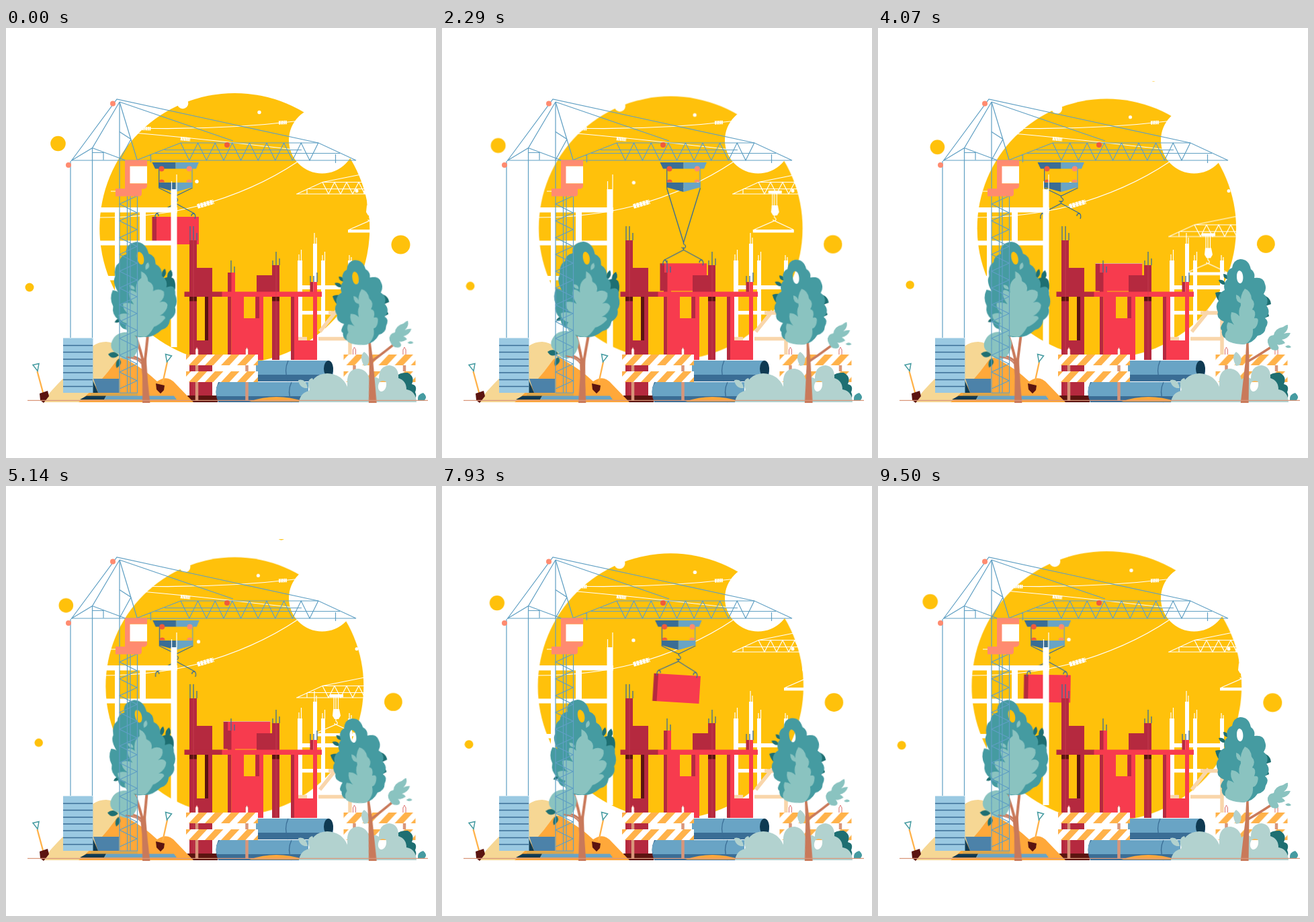
Recreate the animation shown at these times as an HTML page. Size 640 by 640 pixels, loop 9570 ms.

```html
<!DOCTYPE html>
<html lang="en">
<head>
<meta charset="utf-8">
<title>Construction site</title>
<style>
html, body { margin: 0; width: 100%; height: 100%; overflow: hidden; background: #fff; }
svg { display: block; width: 100%; height: 100%; }
.sun, .trolley, .ropes, .hoist, .tilt, .carried, .placed, .jib, .cart, .load, .tree1, .tree2 {
  animation: 9.57s ease-in-out infinite;
}
.sun { animation-name: sun; animation-timing-function: linear; transform-origin: 340.3px 298px; }
.trolley { animation-name: trolley; }
.ropes { animation-name: ropes; transform-origin: 0 238px; }
.hoist { animation-name: hoist; }
.tilt { animation-name: tilt; transform-origin: 359.5px 255px; }
.carried { animation-name: carried; animation-timing-function: step-end; }
.placed { animation-name: placed; animation-timing-function: step-end; }
.jib { animation-name: jib; }
.cart { animation-name: cart; }
.load { animation-name: load; transform-origin: 491px 284px; }
.tree1 { animation-name: tree1; transform-origin: 208px 557px; }
.tree2 { animation-name: tree2; transform-origin: 545px 557px; }

@keyframes sun { 50% { transform: scale(.9515); } }
@keyframes trolley {
  0%, 47%, 53%, 100% { transform: translateX(-107px); }
  14.6%, 32.1%, 65.3%, 79% { transform: none; }
}
@keyframes ropes {
  0%, 15.7%, 31.5%, 65.3%, 79.3%, 100% { transform: scaleY(1); }
  23%, 24.5%, 72%, 73.5% { transform: scaleY(6.77); }
}
@keyframes hoist {
  0%, 15.7%, 31.5%, 65.3%, 79.3%, 100% { transform: translateY(0); }
  23%, 24.5%, 72%, 73.5% { transform: translateY(69.3px); }
}
@keyframes tilt {
  0%, 20%, 79%, 100% { transform: rotate(0deg); }
  7% { transform: rotate(-3deg); }
  15.7% { transform: rotate(-.8deg); }
  83% { transform: rotate(3.5deg); }
  95% { transform: rotate(2deg); }
  99.3% { transform: rotate(.9deg); }
}
@keyframes carried { 0%, 73% { opacity: 1; } 24% { opacity: 0; } 100% { opacity: 1; } }
@keyframes placed { 0%, 73% { opacity: 0; } 24% { opacity: 1; } 100% { opacity: 0; } }
@keyframes jib {
  0%, 27%, 66%, 100% { transform: translateY(0); }
  46%, 54.3% { transform: translateY(68px); }
}
@keyframes cart {
  0%, 11%, 80%, 100% { transform: translateX(50px); }
  27%, 66.3% { transform: translateX(0); }
}
@keyframes load { 0%, 65%, 80%, 100% { transform: rotate(0deg); } 67.2% { transform: rotate(5.5deg); } }
@keyframes tree1 {
  0% { transform: rotate(-1.6deg); animation-timing-function: cubic-bezier(.55,0,.6,1); }
  32.5% { transform: rotate(3.2deg); }
  50% { transform: rotate(-3deg); }
  67% { transform: rotate(3.2deg); animation-timing-function: cubic-bezier(.4,0,.45,1); }
  100% { transform: rotate(-1.9deg); }
}
@keyframes tree2 {
  0% { transform: rotate(-5.7deg); }
  15.7%, 43%, 72%, 99.3%, 100% { transform: rotate(0deg); }
  29.3%, 84% { transform: rotate(-5.4deg); }
  56% { transform: rotate(-7.3deg); }
}

.line { fill: none; stroke: #5f9fc3; stroke-width: 1.2; }
.wire { fill: none; stroke: #fff; stroke-width: 1.2; }
.beads { fill: none; stroke: #fff; stroke-width: 5.5; stroke-dasharray: 2 .6; }
.steel { fill: none; stroke: #3a6d95; stroke-width: 1.3; }
.white { fill: #fff; }
.sunny { fill: #ffc10b; }
.red { fill: #f73b4e; }
.wine { fill: #b5293f; }
.maroon { fill: #5b1410; }
.blue { fill: #69a4c5; }
.mid { fill: #3a6d95; }
.navy { fill: #0f3a52; }
.coral { fill: #ff8b70; }
.flame { fill: #f05a3c; }
.orange { fill: #ffa83a; }
.sand { fill: #f6d794; }
.teal { fill: #459ba1; }
.mint { fill: #8ac3c0; }
.pine { fill: #1e6f72; }
.pale { fill: #b2d2cf; }
.bark { fill: none; stroke: #c9795a; }
</style>
</head>
<body>
<svg viewBox="0 0 640 640">
<defs>
  <clipPath id="stage"><rect y="79" width="640" height="478.500"/></clipPath>
  <pattern id="stripes" x="287" width="24" height="25" y="486" patternUnits="userSpaceOnUse">
    <path fill="#ffb24a" d="M0 0h12.500l-15 16h-12.500zM24 0h12.500l-15 16h-12.500z"/>
  </pattern>
  <g id="barrier">
    <path d="M284 478v76M358.500 478v76" stroke="#d9967a" stroke-width="4.500"/>
    <path d="M282 486v-7l2-4 2 4v7M356.500 486v-7l2-4 2 4v7" fill="#fff" stroke="#d95a5a" stroke-width=".8"/>
    <path class="white" d="M268 486h107v16h-107zM268 511h107v16h-107z"/>
    <path fill="url(#stripes)" d="M268 486h107v16h-107zM268 511h107v16h-107z"/>
  </g>
  <g id="block">
    <path class="red" d="M330 281h64v41h-64z"/>
    <path class="wine" d="M324.500 281h6.500v41h-6.500z"/>
  </g>
</defs>

<!-- sun -->
<g clip-path="url(#stage)">
  <g class="sun">
    <g class="sunny">
      <circle cx="340.300" cy="298" r="201"/>
      <circle cx="77.500" cy="172" r="11.300"/>
      <circle cx="35" cy="386" r="6.500"/>
      <circle cx="587.500" cy="322.500" r="14"/>
      <circle cx="413" cy="65" r="5.300"/>
    </g>
    <g class="white">
      <circle cx="263" cy="112" r="8.300"/>
      <circle cx="377" cy="125.500" r="2.700"/>
      <circle cx="284" cy="228.500" r="2.700"/>
    </g>
  </g>
</g>
<circle class="white" cx="470.500" cy="167" r="49.500"/>
<circle class="white" cx="522" cy="242.500" r="2.500"/>
<path class="wire" d="M140 282Q220 282 285 265 370 242 434 199M196 149Q320 152 434 138.500M190 156Q270 163 340 171L430 181"/>
<path class="beads" d="M203 149.500l13 .3M406 141l12-.6M260 164.500l14 1.500"/>
<path class="beads" style="stroke-width:7;stroke-dasharray:4 .8" d="M285 265.500l24-7"/>

<!-- far scaffold -->
<path class="white" d="M434 346h7v148h-7zM457 321h6v150h-6zM469 346h6v120h-6zM509 346h6v68h-6zM434 383h81v6h-81zM434 421h50v5.500h-50z"/>
<path class="wire" d="M436 346v-9M439.500 346v-16M459 322v-17M462 322v-10M471 347v-9M474.500 347v-14M511 347v-9M514 347v-6"/>
<path fill="none" stroke="#f9d6ab" stroke-width="5.500" d="M512 412v78M480 424h32M465 462.500h47M434 462.500h14M492 421L467 452"/>

<!-- far crane -->
<g class="jib">
  <path class="wire" d="M432 247h118M433 247l38-17.500h80M471 229.500l60-12 20-4M448 240v7M448 239.500h100M471 229.500l9 17.500 9-17.500 9 17.500 9-17.500 9 17.500 9-17.500 9 17.500 9-17.500"/>
  <g class="cart">
    <path class="white" d="M482 242h20v4.500h-20z"/>
    <path class="wire" d="M488 246v20M491 246v20M494.500 246v20"/>
    <g class="load">
      <path class="white" d="M487 264h9l2 10-3 5h-6l-3-5zM459 300h61v4.500h-61z"/>
      <path class="wire" d="M491 278v4q4 2 1 5-3 1-3-2M461 300l30-13 28 13"/>
    </g>
  </g>
</g>

<!-- trolley and its load -->
<g class="placed">
  <use href="#block" x="-.8" y="69.500"/>
  <path d="M323.500 350.500h70" stroke="#dcae9c"/>
</g>
<g class="trolley">
  <g class="ropes"><path class="steel" vector-effect="non-scaling-stroke" d="M334.500 238L359.500 250 384.500 238"/></g>
  <g class="hoist">
    <g class="tilt">
      <g class="carried"><use href="#block"/></g>
      <path class="steel" d="M359.500 249v3q5 3 2 6-3 2-5-1M359.500 257v4L331 276q-3 3-2 8M359.500 261L387 276q3 3 1 8M331 276q3 0 3 4M387 276q-4 0-4 4"/>
    </g>
  </g>
  <path class="mid" d="M324.500 200h35v9.500h-30.500zM334 230h25.500v14l-25.500-7z"/>
  <path class="blue" d="M359.500 200h34.500l-4 9.500h-30.500zM359.500 230h25v7l-25 7z"/>
  <path class="steel" d="M334.700 209v29"/>
  <path class="line" d="M384 209v29"/>
  <path class="flame" d="M334.700 229.500a4 4 0 0 1 8 0z"/>
  <path class="coral" d="M375.500 229.500a4 4 0 0 1 8 0z"/>
  <circle class="flame" cx="338.500" cy="209.500" r="4"/>
  <circle class="coral" cx="379.800" cy="209.500" r="4"/>
</g>

<!-- near scaffold -->
<path class="white" d="M138 267h117v7.500h-117zM138 316.500h110v7h-110zM162 267h7v208h-7zM199 270h9v50h-9zM245.500 240h9v235h-9zM145 369h40v6.500h-40z"/>
<path class="wire" d="M246.500 240v-12M254 240v-22M156 243h14"/>

<!-- building -->
<path class="steel" d="M274 316v-21M279 316v-21M284 316v-11M335 364v-18M340 364v-9M397 353v-7M402 353v-20M407 353v-10M453 378v-9M458 378v-9M463 378v-14"/>
<path class="wine" d="M273 316h11v230h-11zM284 357h23v36h-23zM301 400h6v70h-6zM273 465h34v82h-34zM330 364h6v30h-6zM330 400h5.500v94h-5.500zM371 400h6v33h-6zM373 368h24v25h-24zM396 353h11v141h-11zM424 400h5.500v94h-5.500zM452.500 378h5v16h-5z"/>
<path class="red" d="M335.500 364h5.500v30h-5.500zM335.500 400h18.500v32h17v-32h12v94h-47.500zM457.500 378h5.500v16h-5.500zM429 400h6v65h22v-65h6v94h-34zM321 392.500h149v7.500h-149z"/>
<path class="wine" d="M265.500 392.500h56v7.500h-56zM371.500 400h5.500v32h-5.500z"/>
<path class="maroon" d="M296 400h5v65h-5zM273 400h11v6.500h-11zM396 400h11v6.500h-11zM270 547h45v10h-45z"/>
<path d="M279 316v230M402 353v140" stroke="#c94353" stroke-width=".7"/>

<!-- heaps, stack, planks -->
<path class="sand" d="M54 557C72 532 97 511 115 491Q127 467 149 467 171 468 179 495L215 557z"/>
<path class="orange" d="M108 557Q138 532 166 493 174 488 184 496 206 508 225 526 240 515 252 529L279 557z"/>
<path fill="#4c82a9" d="M130 522h38v21h-31z"/>
<path class="navy" d="M129 524l8 19h-9z"/>
<path fill="#d9a64c" d="M126 543.500h70v4h-70z"/>
<path class="navy" d="M120 547.500h29l-3 5.500h-36z"/>
<path class="blue" d="M149 547.500h101l4 5.500h-108z"/>
<path fill="#9ac9e2" d="M85 461.500h44.500v81.500h-44.500z"/>
<path class="steel" style="stroke-width:1.600" d="M85 472.500h44M85 482.500h44M85 493h44M85 503h44M85 513h44M85 523.500h44M85 533.500h44"/>

<!-- shovels -->
<g fill="none">
  <path stroke="#ffb24a" stroke-width="2.300" d="M46.500 511l9 33M240 497l-7 32"/>
  <path stroke="#459ba1" stroke-width="1.500" d="M40 501.500l9-2-2 11zM237.500 485.500l9 2.500-7 9z"/>
</g>
<path class="maroon" d="M50 544l12-4 2 8-8 10-5-4zM223 529l13 3-1 7-5 5-6-6z"/>

<!-- pipes -->
<path class="mid" d="M372 496h108q7 3 7 14t-7 16h-108zM316 527h134v30h-134q-7-15 0-30z"/>
<path class="blue" d="M372 495h108v21h-108zM318 527h132v21h-136q-4-12 4-21z"/>
<ellipse class="navy" cx="480" cy="507" rx="7" ry="12"/>
<path class="steel" d="M420 495q-7 15 0 31M425 527q-7 14 0 30"/>
<path class="orange" d="M362 556Q402 542 444 556z"/>
<use href="#barrier"/>
<use href="#barrier" x="234.500"/>

<!-- left tree -->
<g clip-path="url(#stage)">
<g class="tree1">
  <path class="pine" d="M235 376q14-8 20-1 5 11-3 28l-14 6zM237 371q-1-8 5-12 4 7-2 13zM245 373q0-9 6-12 5 8-2 14zM165 437q3-7 11-5-3 7-11 5zM173 430q4-5 8-1-4 4-8 1z"/>
  <path class="bark" stroke-width="4" d="M208 500L214 456M207 503Q203 480 195 457"/>
  <path class="bark" stroke-width="3" d="M207 500Q201 488 178 486"/>
  <path fill="#c9795a" d="M203 560l1-42-1.500-24 8-4 1.500 36 2.500 34z"/>
  <g transform="translate(-1.500)">
    <path class="teal" fill-rule="evenodd" d="M202 318Q216 319 220 336 230 339 230 352 240 357 239 370 248 377 245 387 259 381 258 398 262 409 257 417 260 428 249 435 247 448 236 450 224 461 210 460 190 461 184 448 174 447 173 434 162 425 165 413 159 401 165 389 173 390 174 394 164 377 169 369 167 354 176 348 177 338 187 336 184 321 202 318zM206 333c-7 0-3 19 3 19s5-17-3-19z"/>
    <path class="mint" d="M208 362q10 5 10 15 10 5 7 15 9-5 16 1 2 10-7 16 9-3 12 4-1 10-12 16 8-1 8 4-9 10-17 12-8 14-15 15-17-2-24-8-6-9-1-13-12-3-12-13 7-4 16 0-11-8-9-17 9-2 16 2-9-12-6-21 5-1 10 4-2-16 8-22z"/>
    <path class="mint" d="M215 360q-2-8 4-11 4 8-4 11zM190 382q8 0 8 7-8 0-8-7z"/>
  </g>
  <path class="pine" d="M154 484q9-7 16 2-10 8-16-2zM166 505q-3-9 4-14 7 7-4 14z"/>
  <path class="mint" d="M179 452q18 0 21 17-2 20-16 24-12 0-14-9-13-4-11-16 5-15 20-16z"/>
  <path class="bark" stroke-width="2" d="M204 500Q198 491 181 489"/>
</g>
</g>

<!-- near crane -->
<path class="line" d="M169 110V543M195.500 240V543M180.500 250V543M185 250V543M169 543h27M195 250l-26 12 26 13-26 12 26 13-26 12 26 13-26 12 26 13-26 12 26 13-26 12 26 13-26 12 26 13-26 12 26 13-26 12 26 13-26 12 26 13-26 12 26 13-26 12"/>
<path class="line" d="M97 198L165 106 465 171M169 110L128.500 178.500 97 197.500M169 110L195 196M169 110L338 168M128.500 178.500L178 197M96 198V461M128.500 178.500V461M129 185.500h16v11M169 154.500l17 11-17 31"/>
<path class="line" d="M97 197H521L465 171H260L195 196.500M215.500 188v12M490.500 188v13M222 186.500H497M236 181.500H440M260 171l12.800 26 12.800-26 12.800 26 12.800-26 12.800 26 12.800-26 12.800 26 12.800-26 12.800 26 12.800-26 12.800 26 12.800-26 12.800 26 12.800-26 12.800 26 12.800-26"/>
<path class="white" d="M184 205.500h26v26h-26z"/>
<path class="coral" d="M177 196.500h33v9h-25.500v26h25.500v4q-1 4-5 4h-3v7q0 4-4 4h-35v-11.500h14z"/>
<circle class="coral" cx="159" cy="112.500" r="4"/>
<circle class="coral" cx="93" cy="204" r="4"/>
<circle class="flame" cx="329" cy="174" r="4"/>

<!-- bushes and right tree -->
<path class="pine" d="M578 524q4-12 20-11 11 6 6 17 9 2 5 12 4 8-4 15h-30z"/>
<path class="teal" d="M613 554q-1-9 8-11 7 6 2 11z"/>
<path class="pale" fill-rule="evenodd" d="M436 557Q438 543 451 540 454 515 478 514 500 515 508 534V523Q510 507 525 507 538 509 541 523 548 517 555 522 555 503 571 502 585 504 584 521 596 525 596 538 610 540 611 557zM556 527c-4 6-2 14 3 14 8-1 8-14 6-15q-6-2-9 1z"/>
<path class="pale" d="M435 524q11-3 14 12-12 1-14-12zM451 537q-4-14 5-16 6 11-5 16zM533 503q-8-14 0-21 12 8 5 20z"/>
<g clip-path="url(#stage)">
<g class="tree2">
  <path class="pine" d="M507 375q8-2 11 7-9 1-11-7zM514 366q7 0 8 8-8 0-8-8zM502 394q10-3 17 4l-2 14q-12-2-15-18zM570 397q14 2 15 14l-12 4zM570 421q11-1 12 8l-12 5z"/>
  <path fill="#c9795a" d="M539.500 560l7-61 2-35h3l1 30-1 66z"/>
  <path class="bark" stroke-width="3.500" d="M549 497Q562 490 588 473"/>
  <path class="teal" fill-rule="evenodd" d="M539 344Q552 344 555 359 562 364 560 372 574 370 576 381 579 389 574 396 583 403 578 413 586 424 576 432 583 437 577 446 576 456 565 458 557 470 545 470 528 471 523 464 510 462 512 450 507 447 515 437 503 432 506 423 501 413 507 406 505 395 516 390 513 381 520 374 517 361 527 357 529 345 539 344zM538 361c-6 1-5 19 1 19s6-18-1-19z"/>
  <path class="mint" d="M546 388q9 3 10 15 7 7 1 16 7 2 3 13 8-2 5 8-2 7-7 8 1 9-4 16-6 8-11 7-18-1-25-7-4-7 2-14-2-7 1-12 6 1 9 4-7-9-4-19 7 0 12 6-2-9 2-16-2-15 6-25z"/>
  <path class="mint" d="M533 397q7 1 8 13-9-2-8-13z"/>
  <path class="mint" d="M580 468q-1-10 9-11 2-10 14-12 6-4 7-3 1 8-6 13 6-2 10-1-3 8-13 10 4 2 5 5-8 4-12 2 4 5 1 8-11 4-15-11zM606 474q6-4 9 1-5 3-9-1z"/>
</g>
</g>

<path d="M32 554.300H628" stroke="#d9967a" stroke-width="1.200"/>
</svg>
</body>
</html>
```
